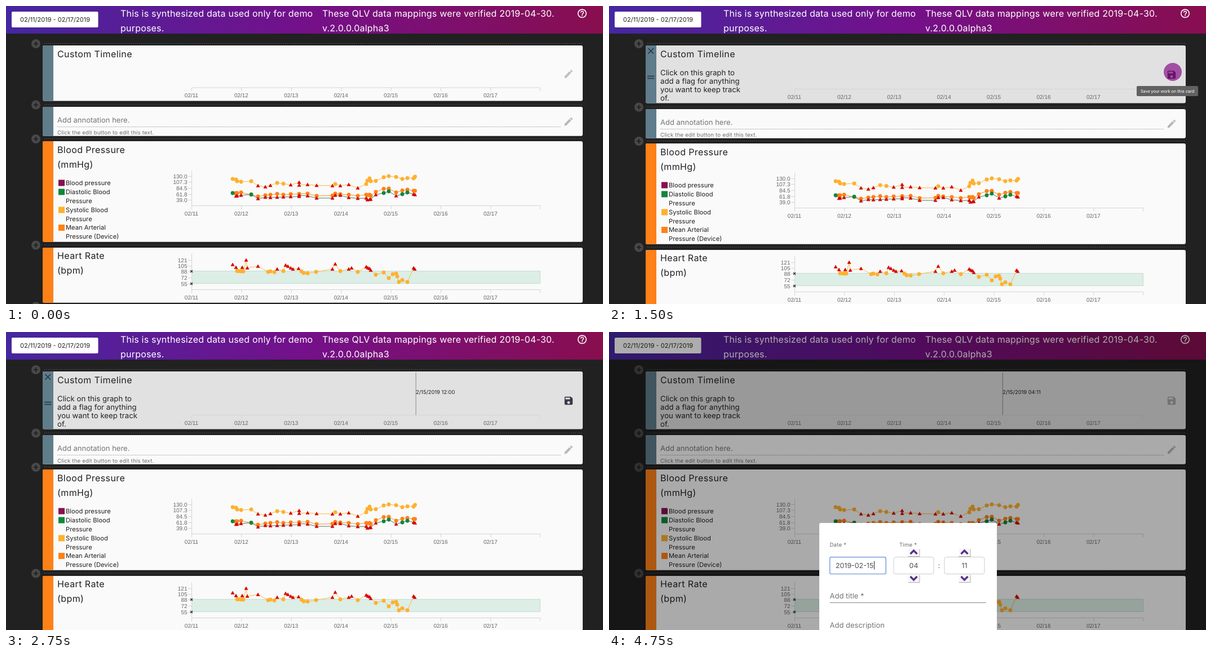
Recreate the animation shown at these times as an HTML page. Size 1059x529 px, loop 5500 ms.

```html
<!DOCTYPE html>
<html lang="en">
<head>
<meta charset="utf-8">
<title>Custom timeline</title>
<style>
html, body { margin: 0; width: 100%; height: 100%; overflow: hidden; background: #212121; }
svg { display: block; width: 1059px; height: 529px; }
text { font-family: Inter, 'Open Sans', sans-serif; fill: #212121; text-rendering: geometricPrecision; white-space: pre; }
.head { font-size: 16px; letter-spacing: .2px; fill: #fff; }
.title { font-size: 16px; letter-spacing: .4px; }
.body { font-size: 13.2px; }
.field { font-size: 13px; fill: #757575; }
.hint { font-size: 9.6px; letter-spacing: .2px; fill: #6b6b6b; }
.key { font-size: 11.2px; }
.axis { font: 10px 'Liberation Sans', Arial, sans-serif; fill: #666; }
.tip { font: 7.8px Roboto, sans-serif; fill: #fff; }
.input { font-size: 12.4px; fill: #4a4f55; }
.mid { text-anchor: middle; }
.end { text-anchor: end; }
.rule { fill: none; stroke: #d3d6d5; }
</style>
</head>
<body>
<svg id="stage" viewBox="0 0 1059 529"></svg>
<script>
const LOOP = 5500, X0 = 329, DAY = 88.4;
const GREY = '#607d8b', ORANGE = '#ff8118', AMBER = '#ffb02e', GREEN = '#12863c', RED = '#d50000';
const PENCIL = 'M3 17.25V21h3.75L17.81 9.94l-3.75-3.75L3 17.25zM20.71 7.04c.39-.39.39-1.02 0-1.41l-2.34-2.34c-.39-.39-1.02-.39-1.41 0l-1.83 1.83 3.75 3.75 1.83-1.83z';
const SAVE = 'M17 3H5c-1.11 0-2 .9-2 2v14c0 1.1.89 2 2 2h14c1.1 0 2-.9 2-2V7l-4-4zm-5 16c-1.66 0-3-1.34-3-3s1.34-3 3-3 3 1.34 3 3-1.34 3-3 3zm3-10H5V5h10v4z';
const HELP = 'M11 18h2v-2h-2v2zm1-16C6.48 2 2 6.48 2 12s4.48 10 10 10 10-4.48 10-10S17.52 2 12 2zm0 18c-4.41 0-8-3.59-8-8s3.59-8 8-8 8 3.59 8 8-3.59 8-8 8zm0-14c-2.21 0-4 1.79-4 4h2c0-1.1.9-2 2-2s2 .9 2 2c0 2-3 1.75-3 5h2c0-2.25 3-2.5 3-5 0-2.21-1.79-4-4-4z';

// Markup helpers
const text = (x, y, cls, s, extra = '') => `<text x="${x}" y="${y}" class="${cls}" ${extra}>${s}</text>`;
const rect = (x, y, w, h, fill, extra = '') => `<rect x="${x}" y="${y}" width="${w}" height="${h}" fill="${fill}" ${extra}/>`;
const path = (d, extra) => `<path d="${d}" ${extra}/>`;
const group = (id, s) => `<g id="${id}">${s}</g>`;
const icon = (d, x, y, extra = '') =>
  path(d, `transform="translate(${x - 9.6} ${y - 9.6}) scale(.8)" ${extra}`);

const divider = y =>
  path(`M68 ${y - .5}H1023`, 'stroke="#5a5a5a" stroke-dasharray="1.5 2"') +
  `<circle cx="53" cy="${y}" r="8" fill="#484848"/>` +
  path(`M49 ${y}h8m-4-4v8`, 'stroke="#1c1c1c" stroke-width="1.7"');

const card = (y, h, color, id = '') =>
  `<g ${id && `id="${id}"`}>` + rect(65, y, 958, h, '#f9faf9', 'class="paper" rx="3"') +
  path(`M84 ${y}v${h}H68q-3 0-3-3V${y + 3}q0-3 3-3z`, `class="side" fill="${color}"`) + '</g>';

function dateAxis(y) {
  let s = path(`M${X0 + .5} ${y + 6}v-6H947.5v6`, 'class="rule"');
  for (let i = 0; i < 7; i++) {
    const x = X0 + i * DAY;
    s += path(`M${x + .5} ${y}v6`, 'class="rule"') + text(x, y + 17, 'axis mid', `02/${11 + i}`);
  }
  return s;
}

const valueAxis = (top, bottom, labels, ys) =>
  path(`M${X0 + .5} ${top}V${bottom}`, 'class="rule"') +
  labels.map((s, i) => path(`M323 ${ys[i] + .5}h6`, 'class="rule"') +
    text(321.5, ys[i] + 3.7, 'axis end', s)).join('');

const mark = (x, y, kind, color) => kind === 't'
  ? path(`M${x} ${y - 3.6}l3.5 6.4h-7z`, `fill="${RED}"`)
  : `<circle cx="${x}" cy="${y}" r="3.4" fill="${color}"/>`;

const series = (xs, ys, kinds, color, line = color) =>
  path('M' + xs.map((x, i) => `${x} ${ys[i]}`).join('L'), `fill="none" stroke="${line}" stroke-width=".9"`) +
  xs.map((x, i) => mark(x, ys[i], kinds[i], color)).join('');

function pressureChart() {
  const xs = [402, 408, 410, 417, 435, 447, 460, 469, 481, 492, 505, 520, 520, 535, 551, 579,
    584, 593, 608, 624, 639, 641, 645, 647, 656, 670, 679, 692, 703, 712, 723, 725.5];
  const systolic = [307, 308, 311, 312, 311, 319, 321, 318.5, 314, 315.5, 317.5, 313, 318, 317, 318.5, 319,
    316, 319, 317, 323, 316, 310, 306, 311, 310.5, 304, 302, 303.5, 307, 305.5, 306, 303];
  const diastolic = [332, 337.5, 337, 336, 334.5, 342, 339.5, 340, 339.5, 339, 338.5, 338, 336, 337, 341, 341,
    336, 336, 340, 341.5, 341, 344, 343.5, 343, 335, 332, 329, 337, 334, 331, 334, 335];
  const mean = [332, 332, 331, 335, 338, 336, 335, 333.5, 335, 334, 334, 333.5, 333, 337, 336.5,
    333, 334, 335, 337, 335, 336, 335, 337, 330, 324.5, 324, 331, 327.5, 326, 328, 328];
  return dateAxis(354.5) +
    valueAxis(292, 355, ['130.0', '107.3', '84.5', '61.8', '39.0'], [302, 312, 323, 334, 344]) +
    series(xs, systolic, 'c'.repeat(5) + 'tttcc' + 't'.repeat(6) + 'cttt' + 'c'.repeat(12), AMBER) +
    series(xs.slice(1), mean, 'c'.repeat(31), ORANGE) +
    series(xs, diastolic, 'ctttc' + 't'.repeat(20) + 'cctcctt', GREEN, '#3c6b52');
}

function rateChart() {
  const pts = [402, 459, 408, 464, 410, 470.5, 413, 470.5, 417, 471, 419, 464, 421, 471, 426, 451, 428, 465,
    447, 462, 465, 472, 469, 471, 476, 472.5, 481, 467, 492, 470.5, 496, 460, 500, 462, 505, 465, 509, 467,
    519, 466, 524, 471, 528, 474, 535, 474.5, 550, 472, 579, 467, 584, 458, 593, 470.5, 608, 467, 613, 465,
    624, 472, 639, 463, 642, 465, 645, 466, 647, 469, 656, 477, 670, 473, 679, 483, 686, 476, 692, 475,
    694, 480, 697, 490, 703, 486.5, 712, 490, 723, 465, 725, 467];
  const xs = pts.filter((v, i) => i % 2 === 0), ys = pts.filter((v, i) => i % 2);
  const cross = y => path(`M327 ${y - 2}l4 4m0-4l-4 4`, 'stroke="#333" stroke-width="1.4"');
  return dateAxis(503.5) +
    valueAxis(440, 504, ['121', '105', '88', '72', '55'], [451, 461, 471, 482, 493]) +
    rect(329.5, 470.5, 618, 22, '#dceee6', 'stroke="#c6ddd2"') + cross(471) + cross(493) +
    series(xs, ys, ys.map(y => y < 470 ? 't' : 'c'), AMBER);
}

function legend() {
  const swatches = [[314, '#880e4f'], [330, GREEN], [362, AMBER], [393.5, ORANGE]];
  const lines = ['Blood pressure', 'Diastolic Blood', 'Pressure', 'Systolic Blood', 'Pressure', 'Mean Arterial', 'Pressure (Device)'];
  return swatches.map(([y, c]) => rect(93, y - 5.5, 11, 11, c)).join('') +
    lines.map((s, i) => text(106, 318.2 + i * 15.83, 'key', s)).join('');
}

const tip = (id, x, y, w, s) => group(id,
  rect(x, y, w, 18, '#616161', 'rx="2"') + text(x + w / 2, y + 11.8, 'tip mid', s));

const header = rect(0, 0, 1059, 49, 'url(#bar)') +
  rect(10, 10, 153.5, 28, '#fff', 'rx="2"') +
  text(87, 27.7, 'mid', '02/11/2019 - 02/17/2019', 'font-size="11"') +
  text(203, 19.3, 'head', 'This is synthesized data used only for demo') + text(203, 44.6, 'head', 'purposes.') +
  text(561, 19.3, 'head', 'These QLV data mappings were verified 2019-04-30.') + text(561, 44.6, 'head', 'v.2.0.0.0alpha3') +
  icon(HELP, 1022, 13.3, 'fill="#fff"');

const timeline = divider(67) + card(70, 98.5, GREY, 'top') +
  text(91, 91, 'title', 'Custom Timeline') +
  group('axis', dateAxis(145)) +
  group('prompt', ['Click on this graph to', 'add a flag for anything', 'you want to keep track', 'of.']
    .map((s, i) => text(91, 123 + i * 15, 'body', s)).join('')) +
  group('handles', path('M69.5 75l9.5 9.5m0-9.5l-9.5 9.5', 'stroke="#26323c" stroke-width="1.6"') +
    path('M68 123h12.5m-12.5 4h12.5', 'id="grip" stroke="#26323c" stroke-width="1.5"')) +
  icon(PENCIL, 998, 120.5, 'id="pencil"') + icon(SAVE, 998, 122, 'id="save"') +
  group('cursor', path('M0 72V147.5', 'stroke="#8a8a8a"') + text(0, 110, '', '', 'id="stamp" font-size="9.3"')) +
  '<circle id="press" r="16" fill="#800080"/>';

const lower = divider(175.5) + card(179, 51.7, GREY) +
  text(91, 206.8, 'field', 'Add annotation here.') +
  path('M91 214.5H985', 'stroke="#999" stroke-dasharray="1.5 1.5"') +
  text(91, 228, 'hint', 'Click the edit button to edit this text.') +
  icon(PENCIL, 998, 205, 'opacity=".3" fill="#212121"') +
  divider(236) + card(240, 178.7, ORANGE) +
  text(91, 261, 'title', 'Blood Pressure') + text(91, 286.5, 'title', '(mmHg)') + legend() + pressureChart() +
  divider(424.5) + card(429, 97.7, ORANGE) +
  text(91, 449, 'title', 'Heart Rate') + text(91, 474.5, 'title', '(bpm)') + rateChart() +
  divider(533.5);

function spinner(x, value) {
  const button = (y, d) => rect(x - 10, y, 20, 14, '#f7f7f7', 'rx="2"') +
    path(`M${x - 10} ${y + 14.5}h20.5v-13`, 'fill="none" stroke="#a8a8a8"') +
    path(`M${x - 6} ${y + 7 + 3 * d}l6 ${-6 * d}l6 ${6 * d}`, 'fill="none" stroke="#57308f" stroke-width="3.4"');
  return button(384, 1) + rect(x - 35.5, 399.5, 71, 30, '#fff', 'rx="3.5" stroke="#ccc"') +
    text(x, 418.6, 'input mid', value) + button(430, -1);
}

const dialog = rect(0, 0, 1059, 529, '#000', 'opacity=".32"') +
  rect(373, 339, 315, 200, '#fff', 'rx="3"') +
  text(391.5, 381.3, 'hint', 'Date *') + text(515, 381.3, 'hint', 'Time *') +
  rect(391.7, 399.7, 99.5, 29.8, '#fff', 'rx="2.5" stroke="#86a9e0" stroke-width="1.7"') +
  text(402, 418.6, 'input', '2019-02-15') +
  path('M470.5 406.5v15', 'id="caret" stroke="#222"') +
  spinner(540.5, '04') + spinner(630.5, '11') + text(585.5, 418.6, 'input mid', ':') +
  text(391.5, 472.5, 'field', 'Add title *') + path('M391.5 480.5H669', 'stroke="#858585"') +
  text(391.5, 524.8, 'field', 'Add description');

const $ = id => document.getElementById(id);
$('stage').innerHTML = `<defs><linearGradient id="bar"><stop stop-color="#4527a0"/>
  <stop offset=".5" stop-color="#74108a"/><stop offset="1" stop-color="#880e4f"/></linearGradient></defs>` +
  header + timeline + group('lower', lower) +
  tip('editTip', 969, 141, 58, 'Edit this card') + tip('saveTip', 936, 142, 109, 'Save your work on this card') +
  group('dialog', dialog);

const set = (id, name, value) => $(id).setAttribute(name, value);
const show = (id, alpha) => set(id, 'opacity', Number(alpha));
const paper = document.querySelector('#top .paper'), side = document.querySelector('#top .side');

// Pointer time on the graph, in minutes after 02/11, from each moment on
const POINTER = [[2250, 8419], [2500, 7540], [2750, 6480], [3000, 6011]];

function stamp(m) {
  const two = n => String(n).padStart(2, '0');
  return `2/${11 + Math.floor(m / 1440)}/2019 ${two(Math.floor(m / 60) % 24)}:${two(m % 60)}`;
}

function draw(t) {
  const editing = t >= 1500, open = t >= 3750, over = t >= 500 && !open;
  const grow = editing ? 4 : 0;

  paper.setAttribute('height', 98.5 + grow);
  paper.setAttribute('fill', editing ? '#e1e1e1' : over ? '#f0f0f0' : '#f9faf9');
  side.setAttribute('transform', `translate(0 ${-70 * grow / 98.5}) scale(1 ${1 + grow / 98.5})`);
  set('lower', 'transform', `translate(0 ${grow})`);
  set('axis', 'transform', `translate(0 ${editing ? 2.5 : 0})`);
  set('grip', 'transform', `translate(0 ${editing ? 1.5 : 0})`);
  show('handles', over);
  show('prompt', editing);

  $('pencil').style.fill = $('save').style.fill = open ? '#212121' : '#3c3a48';
  show('pencil', editing ? 0 : t >= 750 ? 1 : .3);
  show('save', !editing ? 0 : open ? .3 : 1);
  show('editTip', t >= 1000 && !editing);
  show('saveTip', t < 1500 || t >= 2000 ? 0 : t < 1750 ? 1 : .5);

  const now = POINTER.filter(([from]) => t >= from).pop();
  show('cursor', now);
  show('cursor', now ? 1 : 0);
  if (now) {
    set('cursor', 'transform', `translate(${X0 + now[1] / 1440 * DAY + .3} 0)`);
    $('stamp').textContent = stamp(now[1]);
  }

  const clicked = t >= 3500 && !open;
  set('press', 'cx', clicked ? 698.3 : 1000);
  set('press', 'cy', clicked ? 130.3 : 117);
  show('press', clicked ? 1 : t < 1500 || t >= 2000 ? 0 : t < 1750 ? .65 : .25);

  show('dialog', open);
  show('caret', t < 4250 || t >= 4750);
}

const start = performance.now();
function tick() {
  draw((performance.now() - start) % LOOP);
  requestAnimationFrame(tick);
}
tick();
</script>
</body>
</html>
```
